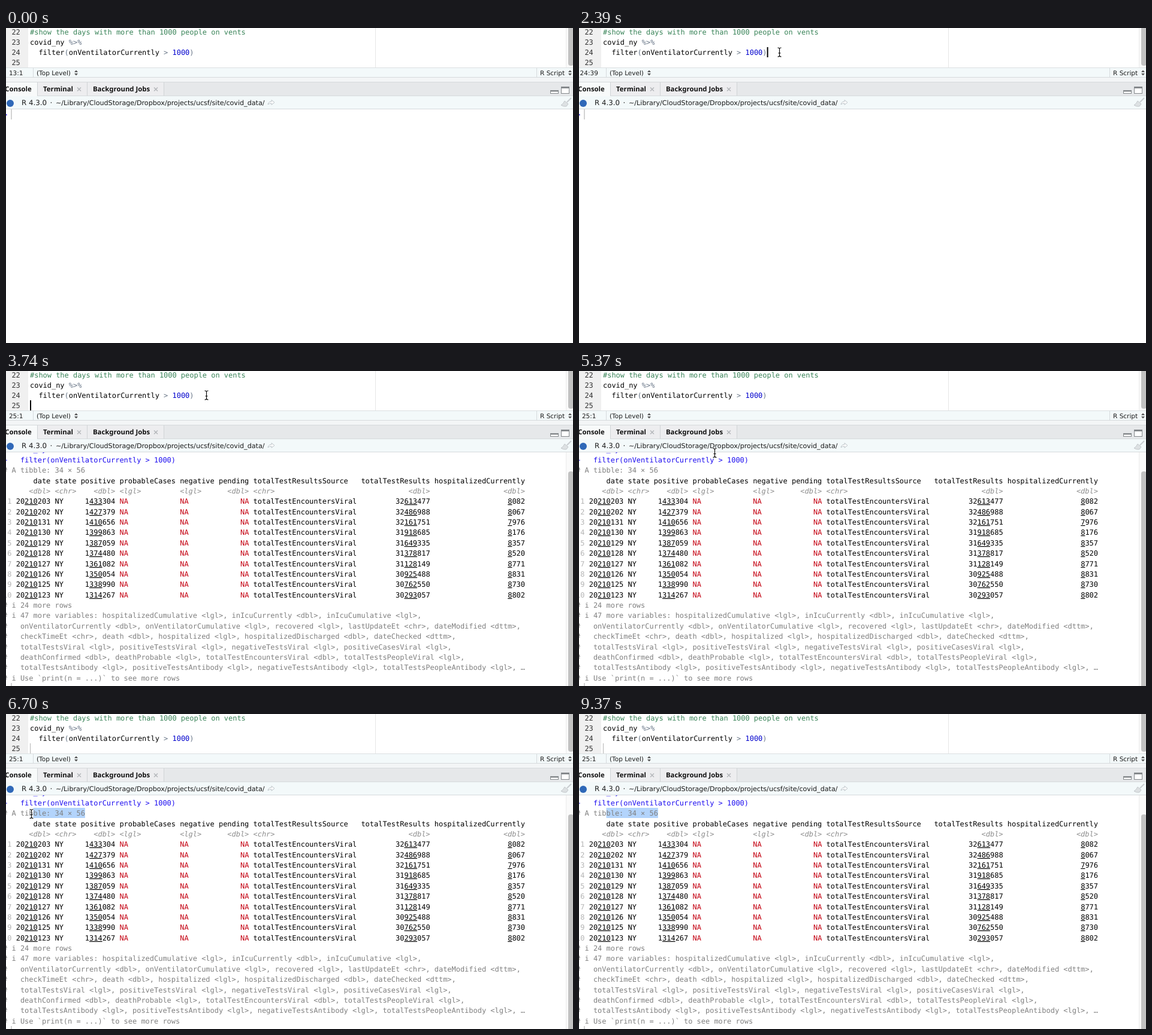
Recreate the animation shown at these times as an HTML page. Size 946 by 527 pixels, loop 9510 ms.

```html
<!DOCTYPE html>
<html lang="en">
<head>
<meta charset="utf-8">
<title>Filtering in the console</title>
<style>
  html, body { margin: 0; width: 100%; height: 100%; overflow: hidden; background: #fff; }
  svg { display: block; width: 946px; height: 527px; }
  text { white-space: pre; text-rendering: geometricPrecision; }
  .code { font: 11.96px "DejaVu Sans Mono", monospace; }
  .ui { font: 10.5px "DejaVu Sans", sans-serif; fill: #1a1a1a; }
  .tab { font: bold 11.35px "Noto Sans", sans-serif; fill: #111; }
  .comment { fill: #3a8459; }
  .op { fill: #687687; }
  .num { fill: #0000cd; }
  .input { fill: #1c0cf0; }
  .dim { fill: #7f7f7f; }
  .row { fill: #b5b5b5; }
  .type { fill: #8c8c8c; font-style: italic; }
  .na { fill: #c40010; }
  .u { text-decoration: underline 1px; text-underline-offset: 1px; }
</style>
</head>
<body>
<svg id="stage" viewBox="0 0 946 527"></svg>
<script>
const LOOP = 9510, FRAME = 149, CHAR = 7.2;
const CODE_X = 40, CODE_LINE = 17, CONSOLE_X = -4.9, CONSOLE_LINE = 17.37;
const stage = document.getElementById("stage");

const esc = s => s.replace(/&/g, "&amp;").replace(/</g, "&lt;").replace(/>/g, "&gt;");
const span = (cls, s) => `<tspan class="${cls}">${esc(s)}</tspan>`;
const text = (x, y, cls, inner, extra = "") => `<text x="${x}" y="${y}" class="${cls}" ${extra}>${inner}</text>`;
const rect = (x, y, w, h, fill, extra = "") => `<rect x="${x}" y="${y}" width="${w}" height="${h}" fill="${fill}" ${extra}/>`;
const lines = (list, top) => list.map((s, i) => text(CONSOLE_X, Math.round(top + i * CONSOLE_LINE), "code", s)).join("");
const updown = x => `<path d="M${x - 3} 74l3-3.4 3 3.4zM${x - 3} 76l3 3.4 3-3.4z" fill="#555"/>`;
const cross = x => `<path d="M${x - 3} 99.5l6 6m0-6l-6 6" stroke="#b4b7ba" stroke-width="1.5"/>`;
const scrollbar = (top, height, thumbY, thumbHeight) =>
  rect(934, top, 1, height, "#ebebeb") + rect(935, top, 11, height, "#fafafa") +
  rect(938, thumbY, 9, thumbHeight, "#c2c2c2", 'rx="4"');

// Editor
const code = [
  span("comment", "#show the days with more than 1000 people on vents"),
  "covid_ny " + span("op", "%>%"),
  "  filter" + span("op", "(") + "onVentilatorCurrently " + span("op", ">") + " " + span("num", "1000") + span("op", ")"),
  ""
];
const editor = rect(0, 0, 37, 66, "#f0f0f0") + rect(616, 0, 1, 66, "#e6e6e6") + scrollbar(0, 66, -10, 73) +
  code.map((s, i) => text(9.4, 11 + i * CODE_LINE, "code", 22 + i, 'fill="#333"') +
    text(CODE_X, 11 + i * CODE_LINE, "code", s)).join("");

// Status bar, tabs and path bar
const bars = rect(0, 66, 946, 17, "#f3f9fa") + rect(0, 66, 946, 1, "#dbe0e2") + rect(0, 82, 946, 1, "#d6dadc") +
  rect(45, 67, 1, 15, "#d6dadc") + rect(885, 67, 1, 15, "#d6dadc") +
  text(16.7, 79, "ui", "", 'id="place" text-anchor="middle"') +
  text(51, 79, "ui", "(Top Level)") + updown(117) + text(891, 79, "ui", "R Script") + updown(941) +
  rect(0, 83, 946, 7, "#f3f5f6") +
  rect(0, 90, 946, 24, "#e6e8ea") + rect(0, 90, 946, 1, "#d6dadc") + rect(0, 113, 946, 1, "#d6dadc") +
  rect(0, 91, 52, 23, "#f8fafa") + rect(53, 91, 210, 22, "#ededef") +
  [52, 135, 263].map(x => rect(x, 91, 1, 22, "#d0d4d6")).join("") +
  text(-1.8, 106, "tab", "Console") + text(62, 106, "tab", "Terminal") + cross(122) +
  text(145, 106, "tab", "Background Jobs") + cross(250) +
  rect(908.5, 104.5, 13, 5, "#fff", 'stroke="#85898c"') + rect(908, 104, 14, 2.5, "#85898c") +
  rect(926.5, 98.5, 13, 11, "#fff", 'stroke="#85898c"') + rect(926, 98, 14, 3, "#85898c") +
  rect(0, 114, 946, 21, "#f3f9fa") + rect(0, 135, 946, 1, "#d6dadc") +
  '<circle cx="7" cy="126" r="6" fill="#2f68b8"/>' +
  text(26, 129, "ui", "R 4.3.0", 'style="font-size:11.8px"') + text(73.5, 129, "ui", "·", 'style="font-size:12px"') +
  text(83, 129, "ui", "~/Library/CloudStorage/Dropbox/projects/ucsf/site/covid_data/", 'style="font-size:11.15px"') +
  '<path d="M437 128q1-5 6-5v-2.500l5 4-5 4v-2.500q-4 0-6 2z" fill="#fff" stroke="#bcc3c8"/>' +
  '<path d="M943 117l-7 7" stroke="#c9cdd0" stroke-width="2"/>' +
  '<path d="M932 122l6 5-3 4q-5 1-9-2 4-2 6-7z" fill="#dde1e3" stroke="#c3c8cb"/>';

// Console text; a column is as wide as its longest cell, and <dbl> columns align right
const echo = `> #show the days with more than 1000 people on vents
> covid_ny %>%
+   filter(onVentilatorCurrently > 1000)`.split("\n").map(s => span("input", s));

const words = s => s.split(/\s+/);
const names = words("date state positive probableCases negative pending totalTestResultsSource totalTestResults hospitalizedCurrently");
const types = words("<dbl> <chr> <dbl> <lgl> <lgl> <dbl> <chr> <dbl> <dbl>");
const days = `20210203 1433304 32613477 8082
20210202 1427379 32486988 8067
20210131 1410656 32161751 7976
20210130 1399863 31918685 8176
20210129 1387059 31649335 8357
20210128 1374480 31378817 8520
20210127 1361082 31128149 8771
20210126 1350054 30925488 8831
20210125 1338990 30762550 8730
20210123 1314267 30293057 8802`.split("\n").map(line => {
  const [date, positive, tests, beds] = words(line);
  return [date, "NY", positive, "NA", "NA", "NA", "totalTestEncountersViral", tests, beds];
});
const widths = names.map((name, c) => Math.max(name.length, ...days.map(day => day[c].length)));
const tableLine = cells => cells.map((s, c) =>
  " " + (types[c] === "<dbl>" ? s.padStart(widths[c]) : s.padEnd(widths[c]))).join("");
const markThousands = s => s.replace(/\d{1,3}(?=\d{3}(?!\d))/g, m => span("u", m));
const markMissing = s => s.replace(/\bNA\b/g, m => span("na", m));

const notes = `# i 24 more rows
# i 47 more variables: hospitalizedCumulative <lgl>, inIcuCurrently <dbl>, inIcuCumulative <lgl>,
#   onVentilatorCurrently <dbl>, onVentilatorCumulative <lgl>, recovered <lgl>, lastUpdateEt <chr>, dateModified <dttm>,
#   checkTimeEt <chr>, death <dbl>, hospitalized <lgl>, hospitalizedDischarged <dbl>, dateChecked <dttm>,
#   totalTestsViral <lgl>, positiveTestsViral <lgl>, negativeTestsViral <lgl>, positiveCasesViral <lgl>,
#   deathConfirmed <dbl>, deathProbable <lgl>, totalTestEncountersViral <dbl>, totalTestsPeopleViral <lgl>,
#   totalTestsAntibody <lgl>, positiveTestsAntibody <lgl>, negativeTestsAntibody <lgl>, totalTestsPeopleAntibody <lgl>, …
# i Use \`print(n = ...)\` to see more rows`.split("\n").map(s => span("dim", s));

const summary = "# A tibble: 34 × 56";
const output = [
  ...echo.slice(1),
  span("dim", summary),
  "  " + tableLine(names),
  span("type", "  " + tableLine(types)),
  ...days.map((day, i) => span("row", String(i + 1).padStart(2)) + markMissing(markThousands(tableLine(day)))),
  ...notes,
  span("input", ">")
];

const prompt = y => rect(8.5, y, 1, 17, "#a8a8a8");
const consolePane = `<clipPath id="pane"><rect y="136" width="946" height="391"/></clipPath><g clip-path="url(#pane)">
  <g id="idle">${lines([span("input", ">")], 149)}${prompt(136)}</g>
  <g id="echo">${lines(echo, 149)}</g>
  <g id="output">
    ${scrollbar(136, 391, 168, 380)}
    <rect id="selection" y="157" height="17" fill="#b3d4fc"/>
    ${lines(output, 152.85 - CONSOLE_LINE)}${prompt(522)}
  </g></g>`;

const beam = "M-3-7.500Q0-7.500 0-5.500Q0-7.500 3-7.500M0-6V6M-3 7.500Q0 7.500 0 5.500Q0 7.500 3 7.500M-2 1.500H2";
const pointer = `<g id="pointer" fill="none"><path d="${beam}" stroke="#fff" stroke-width="2.400" opacity=".8"/><path d="${beam}" stroke="#000" stroke-width="1.100"/></g>`;

stage.innerHTML = rect(0, 0, 946, 527, "#fff") + editor + bars + consolePane +
  '<rect id="caret" height="17"/>' + pointer;

// Pointer glides: start, end, goal. Each begins where the last one ended.
const APPEAR = 300, RUN = 3590, PRINT = 3740, DRAG = 6100, DROP = 6700;
const entry = [315, 2];
const glides = [
  [APPEAR, 1050, 116, 19.5],
  [1490, 2390, 334.5, 40.5],
  [4930, 5370, 226.5, 137],
  [5370, DRAG, 135, 166],
  [DRAG, DROP, 42.5, 167],
  [7140, 7590, 420, 182],
  [8180, 9370, 925, 540]
];
// Clicks and runs put the text caret at a line and column
const caretStops = [[0, 13, 1], [1350, 23, 11], [2390, 24, 39], [RUN, 25, 1]];

const ease = u => u * u * (3 - 2 * u);

function pointerAt(t) {
  let [x, y] = entry;
  for (const [start, end, goalX, goalY] of glides) {
    if (t < start) break;
    const steps = Math.round((end - start) / FRAME);
    const u = ease(Math.min(1, Math.floor((t - start) / (end - start) * steps + 0.05) / steps));
    x += (goalX - x) * u;
    y += (goalY - y) * u;
  }
  return [x, y];
}

// Solid for four frames after each move, then toggling every three
const blinkOn = age => age < 4 * FRAME || Math.floor((age / FRAME - 4) / 3) % 2 === 1;

const el = id => document.getElementById(id);
const set = (id, attrs) => Object.entries(attrs).forEach(([k, v]) => el(id).setAttribute(k, v));

function draw(t) {
  const [x, y] = pointerAt(t);
  set("pointer", { transform: `translate(${x} ${y})`, opacity: +(t >= APPEAR) });

  const [since, line, column] = caretStops.findLast(stop => stop[0] <= t);
  const blurred = t >= DRAG;
  el("place").textContent = `${line}:${column}`;
  set("caret", {
    x: CODE_X + (column - 1) * CHAR, y: 49 + (line - 25) * CODE_LINE,
    width: blurred ? 1 : 2, fill: blurred ? "#b5b5b5" : "#000",
    opacity: +(blurred || blinkOn(t - since))
  });

  const scene = t < RUN ? "idle" : t < PRINT ? "echo" : "output";
  for (const id of ["idle", "echo", "output"]) el(id).style.display = id === scene ? "" : "none";

  // The selection snaps to characters, back from the end of the line
  const [dragX] = pointerAt(Math.min(t, DROP));
  const from = CONSOLE_X + Math.round((dragX - CONSOLE_X) / CHAR) * CHAR;
  const end = CONSOLE_X + summary.length * CHAR;
  set("selection", { x: from, width: t < DRAG ? 0 : Math.max(0, end - from) });
}

const begin = performance.now();
function tick() {
  draw((performance.now() - begin) % LOOP);
  requestAnimationFrame(tick);
}
tick();
</script>
</body>
</html>
```
